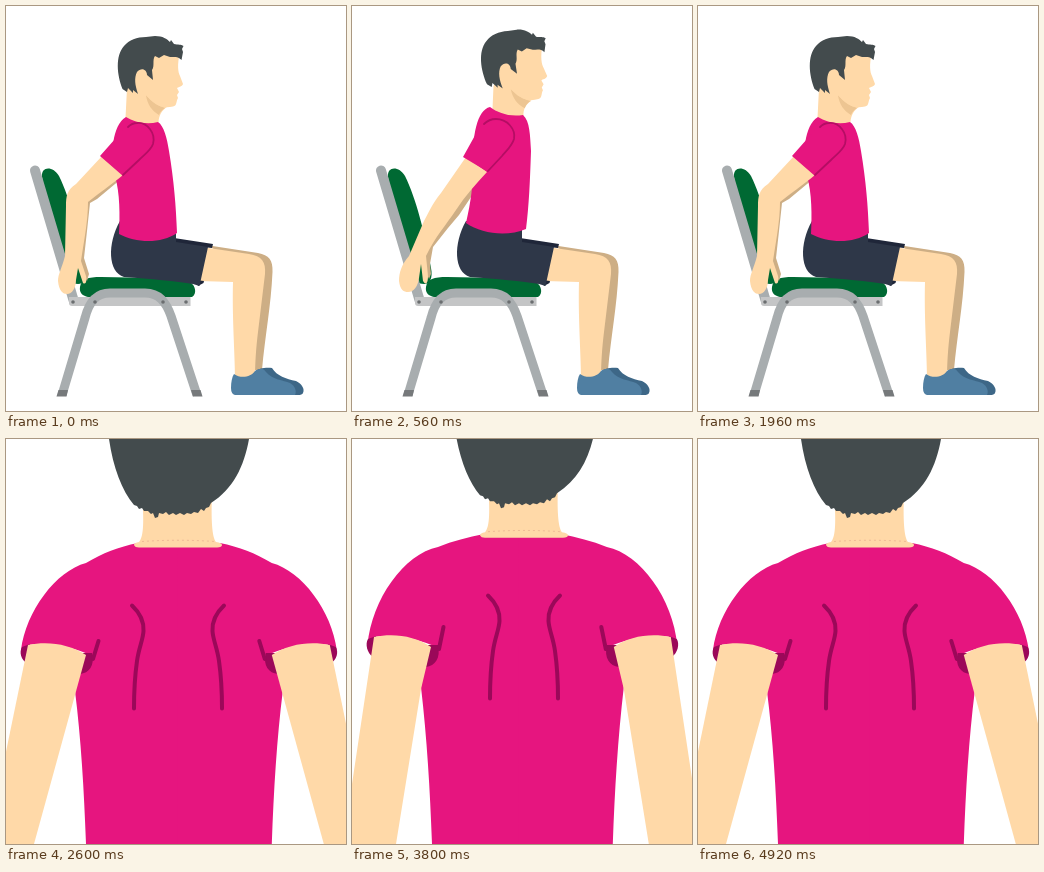
An HTML page for the animation above (5.6 s loop, 340 px wide and 405 px high).

```html
<!DOCTYPE html>
<html lang="en">
<head>
<meta charset="utf-8">
<title>Seated shoulder blade squeeze</title>
<style>
  html, body { margin: 0; width: 100%; height: 100%; overflow: hidden; background: #fff; }
  svg { display: block; width: 100%; height: 100%; }
</style>
</head>
<body>
<svg id="stage" viewBox="0 0 340 405"></svg>
<script>
const LOOP = 5600, STEP = 40;
const SKIN = '#ffd9a8', SHADE = '#cdae85', PINK = '#e6157f', PLUM = '#9b0859',
      HAIR = '#434b4d', GREEN = '#006933', STEEL = '#a8adaf', SHORTS = '#2e3748';

const stage = document.getElementById('stage');
const clamp = v => Math.min(1, Math.max(0, v));

// Blends two paths that share the same commands, number by number.
function mix(a, b, p) {
  const ends = b.match(/-?[\d.]+/g);
  let i = 0;
  return a.replace(/-?[\d.]+/g, n => (+n + (ends[i++] - n) * p).toFixed(2));
}
const fill = (d, color) => `<path d="${d}" fill="${color}"/>`;
const line = (d, color, width, cap = 'round') =>
  `<path d="${d}" fill="none" stroke="${color}" stroke-width="${width}" stroke-linecap="${cap}" stroke-linejoin="round"/>`;
const group = (transform, content) => `<g transform="${transform}">${content}</g>`;
const bolt = x => `<circle cx="${x}" cy="296" r="1.8" fill="#6b6e70"/>`;

const chair =
  fill('M36 171C35 160 47 160 53 170C64 192 73 228 79 262C81 272 78 278 72 278C66 278 64 275 62 268L38 185Z', GREEN) +
  line('M29 164.5L67.5 294', STEEL, 10) +
  fill('M63 291H184.5V300H66Q63 300 63 297Z', '#c4c5c6') +
  fill('M74 281C75 273 82 271 95 271L150 272L184 276C190 280 191 288 186 291H82C77 290 73 287 74 281Z', GREEN) +
  line('M56 389L79 312C83 296 90 287 104 287H139C153 287 160 296 165 310L191 389', STEEL, 9, 'butt') +
  fill('M52.5 384H62L60.5 390.5H50.5ZM185 384H194.5L196.5 390.5H187Z', '#76797b') +
  [67, 89, 157, 180].map(bolt).join('');

const legs =
  fill('M200 239L252 247C263 249 267 254 266.5 266C265 300 259 330 256 364H246L240 260Z', SHADE) +
  fill('M248 366C252 362 261 361 266 362C271 370 280 373 290 375C296 378 299 383 297 387Q296 389 292 389H250Z', '#3d6787') +
  fill('M196 241L243 248C256 250 260 256 259 268L252 326C250 342 249 358 249 371H229C229 350 226 310 227 276L193 275Z', SKIN) +
  fill('M229 389Q225 388 225 382C225 376 226 371 228 368C235 373 245 371 249 365C254 362 257 362 260 366C267 374 277 374 284 377C289 380 291 385 289 389Z', '#507fa2') +
  fill('M168 232L207 238L206 242L168 238ZM190 274L198 275L197.500 277L192 280Z', '#1f2639') +
  fill('M114 215C101 238 102 266 118 271C145 273 170 275 187 278L193.5 280L202 241L170 236V218Z', SHORTS);

const NECK = [
  'M121 82L119.500 112C130 119 145 120 152.500 116C153 109 156 104 161 101L140 60Z',
  'M141.5 80L140.5 103C150 109 160 113 171.500 110C171 103 174 98 179 95L157 53Z'];
const head =
  fill('M140 89C145 95 152 100 159 102C156 104 154 106 153 109C146 105 141 98 140 89Z', '#edc592') +
  fill('M126 60L140 44L174 46C171 59 172 66 174 70L177 78C176 81 172 81 171 82L173 86L171 89L172 92C170 95 171 100 167 100.500C156 103 148 99 139 88L128 80Z', SKIN) +
  fill('M116.5 83C111 69 109 50 118 40C123 34 131 31 140 31L149 30C157 30 161 33 164 36L165 34L168 38C172 39 175 38 177.5 40L176 43L177 46L175.500 54C172 50 168 51 164 51L158 49L153 52L149 50C146 54 149 60 146 64L147 74L141 69C141 63 135 61 131 66C128 72 129 79 132 88L127 84L127 87L122 82L121 86Z', HAIR);

const SHIRT_SIDE = [
  'M120 111C128 116 140 119 152 116C158 120 161 132 163 145C168 175 170 200 171 227C155 238 130 237 113 228C114 210 114 187 109 170C104 150 106 119 120 111Z',
  'M138 101C146 107 157 111 171 109C178 115 178 130 179 145C178 175 177 200 174 223C155 231 130 228 114 217C119 195 121 180 121 160C120 130 125 104 138 101Z'];
const FAR_ARM = [
  'M78 192L112 165L115 173L91 193L84 197L81 225L78 252L83 268L81 275L74 262Z',
  'M74 245L122 165L121 188L107 209L96 222L81 241L78 258L79 268L77 273L72 262Z'];
const ARM = [
  'M97 149L70 178C61 184 60 190 60 200L59 250C56 262 52 268 52 275C53 285 57 288 61 288C66 288 70 282 70 274L72 262L77 277C80 279 81 275 80 270L75 255C78 235 82 215 82 196C92 188 105 179 117 169Z',
  'M114 151L89 187C80 198 76 208 72 215L57 250C50 258 47 266 47 275C48 284 52 286 56 286C62 286 66 280 67 272L69 258L71 275C74 280 76 277 76 270L74 250C83 231 94 219 104 204C113 190 124 178 135 166Z'];
const SLEEVE = [
  'M94 150L117 124C122 119 126 117 131 117C141 116 150 127 147 138C145 144 139 148 133 154L117 170Z',
  'M111 151L126 124C130 117 137 113 144 113C155 113 164 123 162 133C160 140 155 144 150 150L136 166Z'];
const SEAM = [
  'M122 121C125 118 128 117 131 117C141 116 150 127 147 138C145 144 139 148 133 154L117 169',
  'M132 118C135 115 139 113 144 113C155 113 164 123 162 133C160 140 155 144 150 150L136 165'];

function sideView(p) {
  const at = pair => mix(...pair, p);
  return chair + legs + fill(at(NECK), SKIN) +
    group(`translate(${17.8 * p} ${-6.2 * p}) rotate(${-3 * p} 145 70)`, head) +
    fill(at(FAR_ARM), SHADE) + fill(at(SHIRT_SIDE), PINK) + fill(at(ARM), SKIN) +
    fill(at(SLEEVE), PINK) + line(at(SEAM), '#b50d64', 1.8);
}

// The back view is drawn as a left half and mirrored.
const SHIRT_BACK = [
  'M174 104H132C112 108 97 114 80 124C50 132 20 172 15 211L22 206C42 203 64 207 87 217L72 235L69 252C75 300 78 350 80 405H174Z',
  'M174 95H132C116 98 101 102 86 108C52 115 20 160 15.5 206L22 198C42 195 64 199 87 209L72 229L69 248C75 300 78 350 80 405H174Z'];
const CUFF = [
  'M24 205L16 208C13 213 15 221 21 224ZM76 214L86 214C89 227 83 234 74 235Z',
  'M24 197L16 200C13 205 15 214 21 218ZM76 206L86 206C89 219 83 227 74 228Z'];
const CREASE = ['M92.5 202L87 220', 'M91.5 188L87 210'];
const ARM_BACK = [
  'M22 206C42 202 63 205 80 216L69 256L28 405H-19Z',
  'M22 198C42 194 63 197 79 208L69 250L44 405H-9Z'];
const BLADE = 'M126 166.5C134 174 138 183 137.5 192C137 201 133 208 131 222C129 236 128 252 128 269.5';

const neck =
  fill('M136 55C138 80 138 98 133 103Q128 104 128 106Q129 108.5 133 108.5H211Q216 108 216 106Q216 104 210 103C206 98 205 80 206 55Z', SKIN) +
  `<path d="M136 102.5Q172 100 209 102.5" fill="none" stroke="#e5a58c" stroke-width=".6" stroke-dasharray="2 3"/>`;
const backHair = fill('M101 -15L103 0C107 28 116 52 128 66l3 1 2 3 3-1 2 3 4 0 3 3 2-1 2 5 3-1 1-4 4 1 3-2 3 3 4-2 3 2 4-2 4 2 3-2 4 1 3-2 4 1 3-4 3 2 2-3 3-1 2-4C227 50 238 28 243 0L245 -15Z', HAIR);

function backView(p) {
  const at = pair => mix(...pair, p);
  const half = fill(at(SHIRT_BACK), PINK) + fill(at(CUFF), PLUM) +
    line(at(CREASE), PLUM, 4) + fill(at(ARM_BACK), SKIN);
  const blade = group(`translate(${10 * p} ${-10 * p})`, line(BLADE, PLUM, 4));
  const mirror = (axis, content) => group(`translate(${axis}) scale(-1 1)`, content);
  return half + mirror(345.8 - 5 * p, half) + blade + mirror(344, blade) +
    group(`translate(0 ${-9.8 * p})`, neck + backHair);
}

function scene(t) {
  if (t < 2600) return sideView(clamp(t / 560) - clamp((t - 1520) / 440));
  return backView(clamp((t - 3200) / 600) ** 1.15 - clamp((t - 4320) / 600));
}

let shown = -1;
function tick(now) {
  const t = Math.floor(now % LOOP / STEP) * STEP;
  if (t !== shown) stage.innerHTML = scene(shown = t);
  requestAnimationFrame(tick);
}
tick(performance.now());
</script>
</body>
</html>
```
